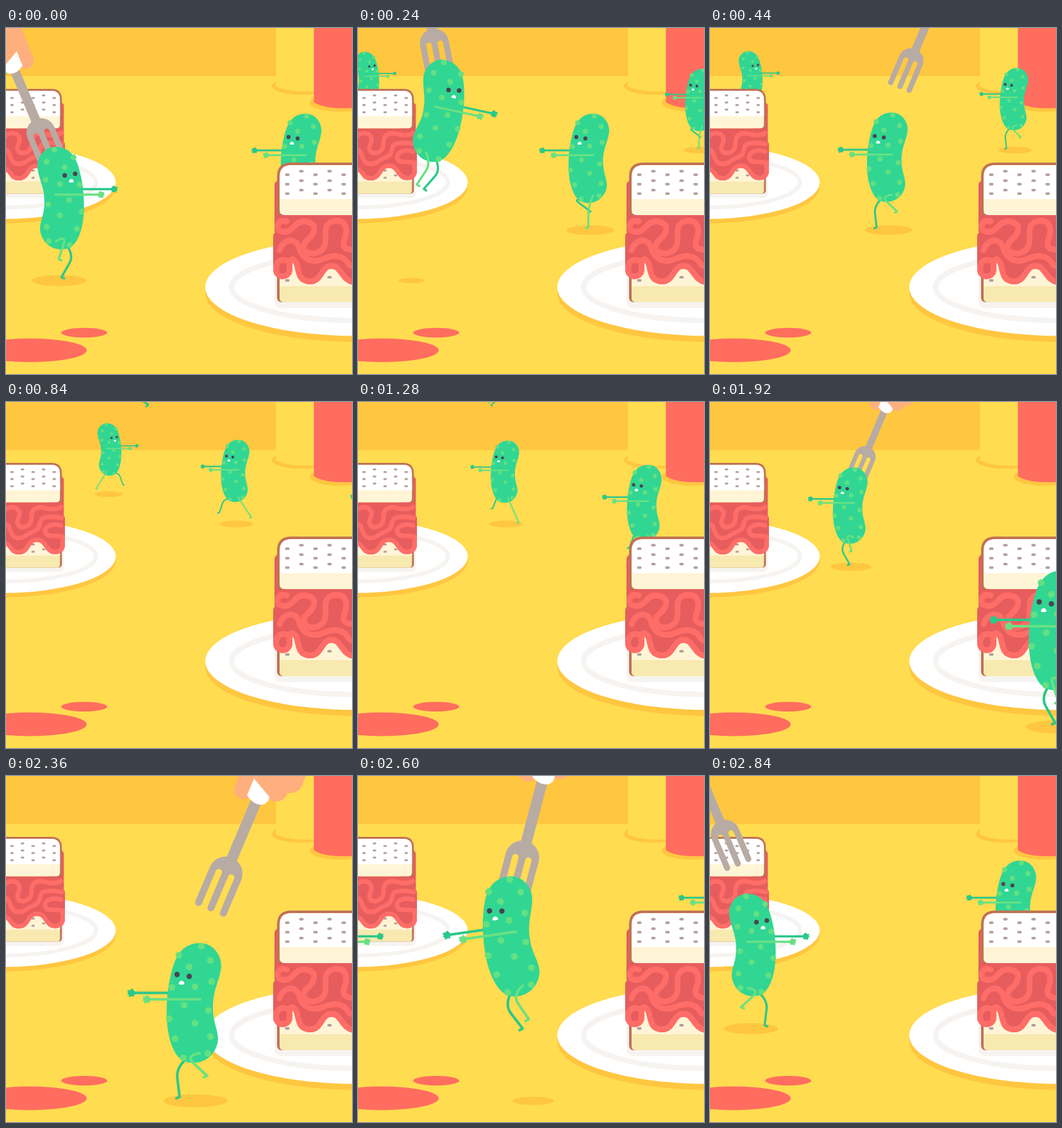
Recreate the animation shown at these times as an HTML page. Size 540 by 540 pixels, loop 2880 ms.

```html
<!DOCTYPE html>
<html lang="en">
<head>
<meta charset="utf-8">
<title>Pickle parade</title>
<style>
  html, body { margin: 0; width: 100%; height: 100%; overflow: hidden; background: #ffdc50; }
  svg { display: block; width: 100vw; height: 100vh; }
  .line { fill: none; stroke-linecap: round; stroke-linejoin: round; }
  .dark { stroke: #2bc88a; stroke-width: 4; }
  .pale { stroke: #69e182; stroke-width: 4; }
</style>
</head>
<body>
<svg viewBox="0 0 540 540">
  <defs>
    <g id="fork">
      <path fill="#ffaf7e" d="M-44-340H56V-240A20 20 0 0 1 40-216A19 19 0 0 1 8-200L-10-210V-192A13 13 0 0 1-40-196Z"/>
      <path fill="#b8aba3" d="M-8.5-80V-190H8.5V-80Z"/>
      <path fill="#b8aba3" d="M-26.5-4V-62a26.5 26.5 0 0 1 53 0V-4a5.5 5.5 0 0 1-11 0V-60a5 5 0 0 0-10 0V-4a5.500 5.500 0 0 1-11 0V-60a5 5 0 0 0-10 0V-4a5.500 5.500 0 0 1-11 0Z"/>
      <path fill="#fff" d="M-17-188Q0-176 13-185Q19-192 16-199L-17-216Z"/>
    </g>
    <g id="hand">
      <circle r="5"/>
      <path class="line" stroke-width="3" d="M0 0L-5-3M0 0L-5 1M0 0L-3 5M0 0L1-5M0 0L3 4"/>
    </g>
    <g id="body">
      <path fill="#31d693" d="M303 261C322 261 336 278 336 297C334 320 323 332 323 362C323 385 331 395 331 412C329 433 312 448 293 448C270 448 262 432 256 412C248 385 250 340 257 312C263 285 273 261 303 261Z"/>
      <g id="spots" fill="#63e082"></g>
      <g fill="#4a4450"><circle cx="267" cy="310" r="4.2"/><circle cx="286" cy="313" r="4.2"/></g>
      <path fill="#fff" d="M269.500 325C270 318 278 318 278.500 325Q274 327 269.500 325Z"/>
    </g>
    <g id="meal">
      <ellipse cx="546" cy="413.800" rx="235" ry="76" fill="#ffc640"/>
      <ellipse cx="546" cy="404.500" rx="235" ry="76" fill="#fff"/>
      <ellipse cx="546" cy="404.500" rx="194" ry="52" fill="none" stroke="#f6f3f0" stroke-width="8"/>
      <rect x="419" y="340" width="160" height="97" rx="10" fill="#f6f3f0"/>
      <rect x="419" y="238" width="30" height="85" rx="7" fill="#e75d5d"/>
      <rect x="423" y="340" width="160" height="88" rx="7" fill="#c07355"/>
      <rect x="427" y="340" width="160" height="88" rx="6" fill="#f8e9b0"/>
      <path fill="#fff5d6" d="M427 340H580V403H427Z"/>
      <path fill="#c07355" d="M423 292V232Q423 210 445 210H580V292Z"/>
      <path fill="#fff5d6" d="M427 250H580V292H435Q427 292 427 284Z"/>
      <path fill="#fff" d="M427 267V232Q427 214 445 214H580V267Z"/>
      <g id="dots" fill="#b5a09c"></g>
    </g>
  </defs>

  <rect width="540" height="540" fill="#ffdc50"/>
  <rect width="540" height="75" fill="#ffc640"/>
  <ellipse cx="460" cy="90.500" rx="45" ry="13.500" fill="#ffc640"/>
  <path fill="#ffdc50" d="M421 0H500V98Q445 103 421 91Z"/>
  <ellipse cx="522" cy="116.500" rx="48" ry="14" fill="#ffc640"/>
  <path fill="#ff6d5f" d="M480.500 0H540V125Q498 127 480.500 116Z"/>
  <g fill="#ff6d5f">
    <ellipse cx="122" cy="475.500" rx="36" ry="7.500"/>
    <ellipse cx="37" cy="503" rx="89" ry="18.500"/>
  </g>
  <g id="back"></g>

  <use href="#meal"/>
  <path fill="#e75d5d" d="M423 292H560V401C528 402 523 376 508 376C493 376 497 400 474 400C450 400 456 362 447 362V377A15 15 0 0 1 417 377V326Q417 321 420 319V298Q420 292 423 292Z"/>
  <g class="line" stroke="#ff6d68" stroke-width="9">
    <path d="M438 302C424 296 418 316 431 318C449 321 449 300 467 302C489 305 481 322 470 331C456 344 472 357 487 350C511 340 487 310 509 302C532 296 534 316 528 330C522 348 541 351 560 338"/>
    <path d="M427 347C432 329 452 326 457 342C462 360 477 369 496 360C514 352 529 357 534 368Q539 375 560 373"/>
    <path d="M441 364C426 358 421 368 421.500 377C422 391 442 391 442.500 376V366Q447 354 454 369C457 385 459 395 474 395.500C493 396 492 371 508 371C524 371 524 396 545 397"/>
  </g>

  <use href="#meal" transform="translate(404.500 -62.400) scale(-.75 .75)"/>
  <path fill="#e75d5d" d="M-5 157H85Q89 157 89 162V176Q92 178 92 183V223C92 232 85 237.500 77 237.500C59 237.500 63 218 48 218C35 218 38 238 20 238C4 238 8 223-5 223Z"/>
  <g class="line" stroke="#ff6d68" stroke-width="7">
    <path d="M-3 169C12 159 25 167 20 180C14 192 22 198 32 194C46 188 34 172 46 166C58 160 70 173 86 164"/>
    <path d="M-3 190C8 190 4 206 14 211C26 216 32 206 43 202C58 197 48 182 62 180Q74 178 87 181"/>
    <path d="M86 193C70 188 57 196 62 205C66 212 76 207 86 210"/>
    <path d="M-5 219.500C9 219.500 5 234.500 20 234.500C36 234.500 33 215 48 215C64 215 61 234 77 234C84 234 88.500 229 88.500 223V210"/>
  </g>
  <g id="front"></g>
</svg>
<script>
const LOOP = 2880, STEP = 40, CYCLE = 480, SPEED = 0.561;
const $ = id => document.getElementById(id);
const mix = (a, b, k) => a + (b - a) * k;

// facing: 1 walks left, -1 walks right; x is where the fork strikes at time hit
const walkers = [
  { facing: -1, size: .437, x: 191.5, ground: 143, hit: 960, layer: 'back' },
  { facing: 1, size: .52, x: 182, ground: 189.5, hit: 1440, layer: 'back' },
  { facing: 1, size: .635, x: 218, ground: 256, hit: 1920, layer: 'back' },
  { facing: 1, size: .745, x: 259, ground: 314, hit: 480, layer: 'back' },
  { facing: -1, size: .855, x: 86.5, ground: 392.5, hit: 0, layer: 'front' },
  { facing: 1, size: 1, x: 269.5, ground: 505, hit: 2400, layer: 'front' }
];

// ankle positions through one stride, evenly spaced in time
const stride = [[0, -4], [23, -3], [43, -2], [50, -18], [40, -32], [22, -37],
  [5, -37], [-18, -46], [-35, -46], [-46, -33], [-44, -5], [-21, -4]];

$('spots').innerHTML = [[305, 266], [270, 280], [319, 288], [286, 298], [259, 330], [295, 329],
  [321, 321], [278, 358], [316, 366], [255, 379], [295, 386], [319, 407], [264, 410], [315, 433], [277, 440]]
  .map(([x, y]) => `<circle cx="${x}" cy="${y}" r="5.3"/>`).join('');

const dot = (x, y) => `<rect x="${x - 3.5}" y="${y - 2}" width="7" height="4" rx="1.8"/>`;
let dots = dot(439, 394) + dot(505, 389) + dot(483, 380) + dot(483, 395) + dot(461, 390);
for (let col = 0; col < 5; col++)
  for (let row = 0; row < 3; row++) dots += dot(439 + col * 22, (col % 2 ? 223.5 : 229) + row * 14.7);
$('dots').innerHTML = dots;

for (const w of walkers) {
  const root = document.createElementNS('http://www.w3.org/2000/svg', 'g');
  root.innerHTML = `
    <ellipse data-part="shadow" fill="#ffc640"/>
    <g data-part="lift">
      <g data-part="fork"><use href="#fork" transform="rotate(23)"/></g>
      <g data-part="walk">
        <path data-part="darkLeg" class="line dark"/>
        <g data-part="darkArm">
          <path class="line dark" d="M-30-165H-96"/>
          <use href="#hand" x="-96" y="-165" fill="#2bc88a" stroke="#2bc88a"/>
        </g>
        <g data-part="torso"><use href="#body" x="-292" y="-503"/></g>
        <path data-part="paleLeg" class="line pale"/>
        <g data-part="paleArm">
          <path class="line pale" d="M11-155H-72"/>
          <use href="#hand" x="-72" y="-155" fill="#69e182" stroke="#69e182"/>
        </g>
      </g>
    </g>`;
  root.setAttribute('transform', `translate(${w.x} ${w.ground}) scale(${w.facing * w.size} ${w.size})`);
  $(w.layer).append(root);
  w.root = root;
  w.part = {};
  root.querySelectorAll('[data-part]').forEach(el => w.part[el.dataset.part] = el);
}

function ankle(phase) {
  const p = (phase % CYCLE + CYCLE) % CYCLE / STEP, i = Math.floor(p);
  const a = stride[i], b = stride[(i + 1) % stride.length];
  return [mix(a[0], b[0], p - i), mix(a[1], b[1], p - i)];
}

// short thigh, long shin, knee bending forward
function legPath(hx, hy, [fx, fy]) {
  const thigh = 22, shin = 46;
  const dx = fx - hx, dy = fy - hy, full = Math.hypot(dx, dy);
  const d = Math.min(Math.max(full, shin - thigh), thigh + shin);
  const along = (thigh * thigh - shin * shin + d * d) / (2 * d);
  const out = Math.sqrt(Math.max(0, thigh * thigh - along * along));
  const ux = dx / full, uy = dy / full;
  const kx = hx + ux * along - uy * out, ky = hy + uy * along + ux * out;
  const mx = mix(kx, fx, .35), my = mix(ky, fy, .35);
  return `M${hx} ${hy}Q${kx} ${ky} ${mx} ${my}L${fx} ${fy}l-5 2`;
}

function pose(w, time) {
  const dt = (time - w.hit + 2400 + LOOP) % LOOP - 2400;
  const { shadow, lift, fork, walk, darkLeg, paleLeg, torso, darkArm, paleArm } = w.part;
  const visible = dt < 440;
  w.root.style.display = visible ? '' : 'none';
  if (!visible) return;

  const before = Math.min(dt, 0);
  const away = -before * SPEED;
  const bob = -4.5 * (1 - Math.cos(before * Math.PI * 2 / 240));
  const rise = (Math.max(dt, 0) / 320) ** 2.2;
  const hang = Math.min(rise * 2, 1);

  const shrink = Math.max(0, 1 - rise);
  shadow.setAttribute('cx', away + 4);
  shadow.setAttribute('cy', 2);
  shadow.setAttribute('rx', 50 * shrink);
  shadow.setAttribute('ry', 10 * shrink);

  lift.setAttribute('transform',
    `translate(${-130 * rise} ${-298 * rise}) rotate(${-23 * Math.min(rise, 1.3)} 10 -240)`);
  const gap = -before * 2.3;
  fork.setAttribute('transform', `translate(${13 + gap * .39} ${-211 - gap * .92})`);
  walk.setAttribute('transform', `translate(${away} 0)`);
  torso.setAttribute('transform', `translate(0 ${bob})`);
  for (const arm of [darkArm, paleArm]) arm.setAttribute('transform', `translate(0 ${bob * .65})`);

  const pale = ankle(before + CYCLE / 2);
  const dangling = [mix(pale[0], 14, hang), mix(pale[1], -9, hang)];
  darkLeg.setAttribute('d', legPath(-10, -62 + bob, ankle(before)));
  paleLeg.setAttribute('d', legPath(10, -70 + bob, dangling));
}

const start = performance.now();
function draw() {
  const elapsed = (performance.now() - start) % LOOP;
  const time = Math.floor(elapsed / STEP) * STEP;
  for (const w of walkers) pose(w, time);
  requestAnimationFrame(draw);
}
draw();
</script>
</body>
</html>
```
